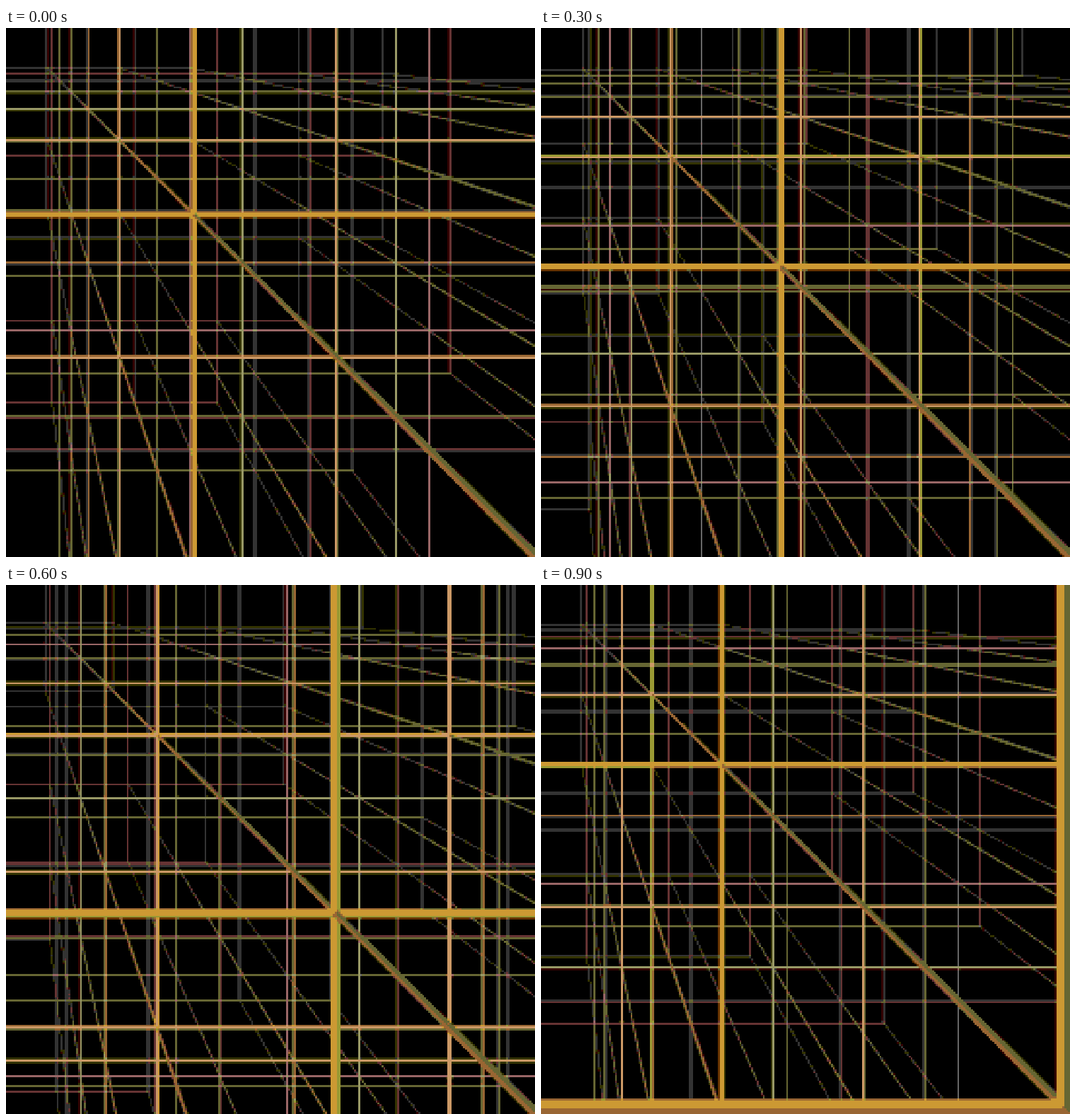
Recreate the animation shown at these times as an HTML page with a canvas. Size 748 by 748 pixels, loop 1000 ms.

```html
<!DOCTYPE html>
<html>
<head>
<meta charset="utf-8">
<title>Lattice flight</title>
<style>
  html, body { margin: 0; width: 100%; height: 100%; overflow: hidden; background: #000; }
  canvas { display: block; width: 100vw; height: 100vh; image-rendering: pixelated; }
</style>
</head>
<body>
<canvas id="view" width="272" height="272"></canvas>
<script>
const SIZE = 272, CELL = 2.75;
const ctx = document.getElementById('view').getContext('2d', { willReadFrequently: true });

const VX = 7.1, VY = 5.6;    // vanishing point
const FOCAL = 376;
const BAR = 11;              // bar thickness at depth 1
const RAY = 7;               // thickness of receding bars at depth 1
const REACH = 292.8;         // squared radius of the visible ball
const DEPTH = 4.4;           // weight of depth in that radius
const PLANES = 8;
const MAX = 15;

const clamp = v => Math.min(1, Math.max(0, v));
const mix = (a, b, t) => a + (b - a) * clamp(t);
const blend = (p, q, t) => p.map((v, k) => mix(v, q[k], t));
const css = (c, gain = 1) => `rgb(${c.map(v => Math.round(v * gain)).join()})`;
const px = (i, z) => VX + FOCAL * i / z;
const py = (j, z) => VY + FOCAL * j / z;
const inside = (i, j, z) => DEPTH * z * z + i * i + j * j <= REACH;
const fog = (i, z) => 1 - 0.026 * Math.hypot(2 * z, i);

const GOLD = [204, 153, 51], TAN = [218, 188, 137], DUST = [168, 143, 88];
const OLIVE = [112, 106, 42], BROWN = [153, 104, 50];

function barColor(i, z) {
  if (z < 1.7) return css(GOLD);
  return css(blend([225, 171, 80], TAN, (z - 1.7) / 2.8), mix(1, fog(i, z), (z - 1.2) / 2));
}

function drawPlane(z) {
  ctx.globalCompositeOperation = z > 1.7 ? 'lighten' : 'source-over';
  const w = BAR / z;
  for (let i = MAX; i > 0; i -= 2) {
    const x = px(i, z) - w / 2, y = py(i, z) - w / 2;
    if (y > SIZE * CELL) continue;
    let j = MAX;
    while (j > 0 && !inside(i, j, z)) j -= 2;
    if (j < 1) continue;
    const right = px(j, z) + w / 2, bottom = py(j, z) + w / 2;
    ctx.fillStyle = barColor(i, z);
    ctx.fillRect(x, 0, w, bottom);
    ctx.fillRect(0, y, right, w);
    if (z < 1) {
      // outer half turns away from the light as it comes close
      const t = (1 - z) / 0.35;
      ctx.fillStyle = css(blend(GOLD, OLIVE, t));
      ctx.fillRect(x + w * 0.55, 0, w * 0.45, bottom);
      ctx.fillStyle = css(blend(GOLD, BROWN, t));
      ctx.fillRect(0, y + w * 0.55, right, w * 0.45);
    }
  }
}

function strip(i, j, near, far, lo, hi) {
  const d = Math.hypot(i, j), nx = j / d, ny = -i / d;
  const corner = (z, s) => [px(i, z) + nx * s * RAY / z, py(j, z) + ny * s * RAY / z];
  ctx.beginPath();
  for (const [z, s] of [[far, lo], [far, hi], [near, hi], [near, lo]]) ctx.lineTo(...corner(z, s));
  ctx.fill();
}

function drawRays(near, far) {
  ctx.globalCompositeOperation = near > 1.7 ? 'lighten' : 'source-over';
  const parts = 4;
  for (let i = 1; i <= MAX; i += 2) {
    for (let j = 1; j <= MAX; j += 2) {
      if (!inside(i, j, far) || Math.max(px(i, far), py(j, far)) > SIZE * CELL + 10) continue;
      for (let k = parts; k > 0; k--) {
        const a = near + (far - near) * (k - 1) / parts;
        const b = near + (far - near) * k / parts;
        const z = (a + b) / 2;
        const shade = c => css(blend(c, DUST, (z - 1) / 3),
          mix(1, fog(Math.hypot(i, j) / 2, z) + 0.1, (z - 1) / 3));
        ctx.fillStyle = shade(j >= i ? BROWN : OLIVE);
        strip(i, j, a, b, -0.5, 0.5);
        if (i === j) {
          ctx.fillStyle = shade(OLIVE);
          strip(i, j, a, b, 0, 0.5);
        }
      }
    }
  }
}

// Snap every channel to six levels
function quantize() {
  const img = ctx.getImageData(0, 0, SIZE, SIZE), d = img.data;
  for (let k = 0; k < d.length; k++) d[k] = Math.round(d[k] / 51) * 51;
  ctx.putImageData(img, 0, 0);
}

function draw(step) {
  const z0 = 1.4545 - 0.1084 * step + 0.00043 * step * step;
  ctx.setTransform(1, 0, 0, 1, 0, 0);
  ctx.globalCompositeOperation = 'source-over';
  ctx.fillStyle = '#000';
  ctx.fillRect(0, 0, SIZE, SIZE);
  ctx.scale(1 / CELL, 1 / CELL);
  for (let n = PLANES; n >= 0; n--) {
    drawPlane(z0 + n);
    drawRays(n ? z0 + n - 1 : Math.min(0.4, z0 - 0.1), z0 + n);
  }
  quantize();
}

let shown = -1;
function tick() {
  const step = Math.floor(performance.now() % 1000 / 100);
  if (step !== shown) draw(shown = step);
  requestAnimationFrame(tick);
}
tick();
</script>
</body>
</html>
```
